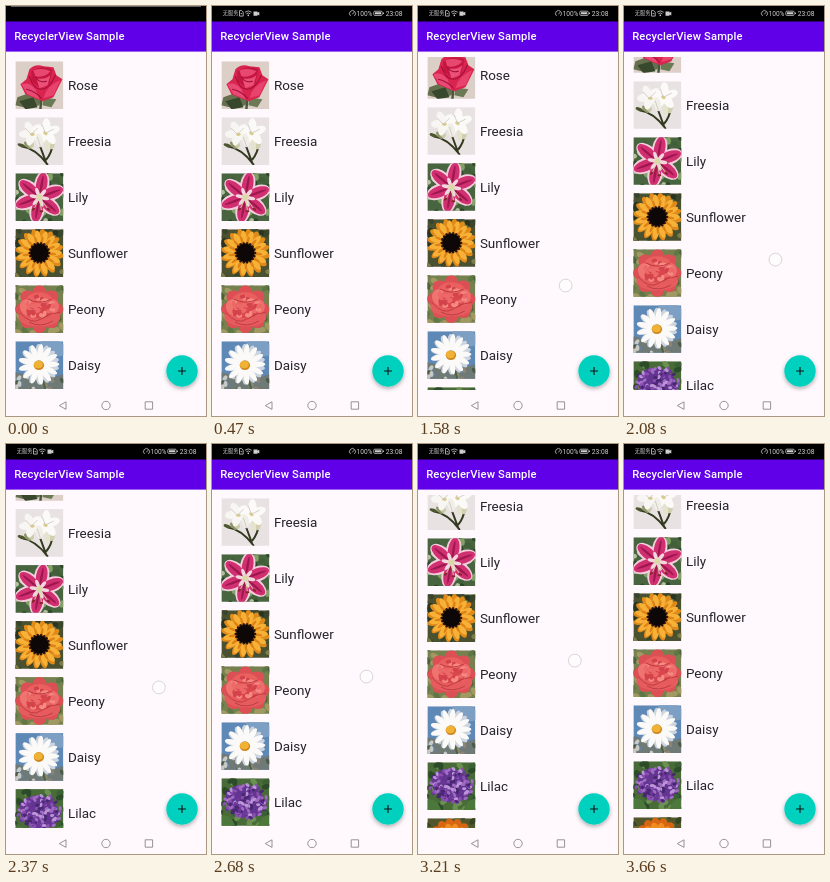
An HTML page for the animation above (3710 ms loop, 200 px wide and 410 px high).

```html
<!DOCTYPE html>
<html lang="en">
<head>
<meta charset="utf-8">
<title>RecyclerView Sample</title>
<style>
  html, body { margin: 0; width: 100%; height: 100%; overflow: hidden; background: #fff8fd; }
  #stage { display: block; width: 200px; height: 410px; font-family: Roboto, sans-serif; }
  .title { font-size: 11.2px; font-weight: 500; letter-spacing: .0125em; fill: #fff; }
  .name { font-size: 13.45px; fill: #252428; }
  #status { font-size: 6.6px; fill: #cfcfcf; }
  .line { fill: none; stroke: #cfcfcf; stroke-width: .8; }
  .nav { fill: none; stroke: #8b878b; stroke-width: .9; }
</style>
</head>
<body>
<svg id="stage" viewBox="0 0 200 410">
  <defs>
    <clipPath id="view"><rect y="51" width="200" height="333"/></clipPath>
    <filter id="shadow" x="-40%" y="-40%" width="180%" height="190%">
      <feDropShadow dx="0" dy="1.8" stdDeviation="2.2" flood-opacity=".32"/>
    </filter>
  </defs>
  <rect width="200" height="410" fill="#fff8fd"/>
  <g clip-path="url(#view)"><g id="list"></g></g>
  <rect width="200" height="16" fill="#000"/>
  <rect y="15.5" width="200" height="30.1" fill="#5f00e8"/>
  <text class="title" x="8.2" y="34.3">RecyclerView Sample</text>
  <path id="edge" d="M5 .5H195" stroke="#666"/>

  <g id="status" transform="translate(0 -.4)">
    <text x="10.8" y="9.9" font-size="5.2" font-family="Noto Sans CJK SC, Noto Sans CJK, sans-serif">无服务</text>
    <path class="line" d="M27.5 5h2.2l1.5 1.5v4h-3.7zM28.6 8h1.5M33 6.6q3.3-2.6 6.6 0M34.3 8.2q2-1.6 4 0"/>
    <circle cx="36.3" cy="9.8" r=".8"/>
    <path d="M41.5 5.8h4v1.3l1.8-1v3.8l-1.8-1v1.3h-4z"/>
    <path class="line" d="M138.6 10.3a3 3 0 1 1 3.8 0M140.4 8.7l1.5-2"/>
    <text x="144.5" y="10.1">100%</text>
    <rect class="line" x="161.8" y="5.6" width="8.4" height="4.2" rx="1"/>
    <path d="M163 6.7h6v2h-6zM171 7h.9v1.5h-.9z"/>
    <text x="173.8" y="10.2" font-size="6.7">23:08</text>
  </g>

  <circle id="touch" r="6.4" fill="#fff" fill-opacity=".6" stroke="#cfcbcf" stroke-width=".8"/>
  <circle cx="176" cy="365" r="15.7" fill="#06d1be" filter="url(#shadow)"/>
  <path d="M172.1 365h7.8M176 361.1v7.8" stroke="#111" stroke-width="1.1"/>
  <path class="nav" d="M60 395.8v7.6l-6.7-3.8zM139.2 395.8h7.4v7.4h-7.4z"/>
  <circle class="nav" cx="100" cy="399.5" r="4.2"/>
</svg>
<script>
const $ = id => document.getElementById(id);

const fillRect = color => `<rect width="48" height="48" fill="${color}"/>`;
const oval = (x, y, rx, ry, fill, turn = 0) =>
  `<ellipse cx="${x}" cy="${y}" rx="${rx}" ry="${ry}" fill="${fill}" transform="rotate(${turn} ${x} ${y})"/>`;
const shape = (d, fill) => `<path d="${d}" fill="${fill}"/>`;
const stroke = (d, color, width = 1) =>
  `<path d="${d}" fill="none" stroke="${color}" stroke-width="${width}" stroke-linecap="round"/>`;

// Petals around a centre
const ring = (n, x, y, dist, rx, ry, fill, start = 0) =>
  Array.from({ length: n }, (_, i) => {
    const deg = start + i * 360 / n, a = deg * Math.PI / 180;
    return oval(x + dist * Math.cos(a), y + dist * Math.sin(a), rx, ry, fill, deg);
  }).join('');

// Seeded scatter inside an ellipse
function scatter(n, x, y, w, h, size, colors, seed = 7) {
  const random = () => (seed = seed * 16807 % 2147483647) / 2147483647;
  random();
  return Array.from({ length: n }, (_, i) => {
    const a = random() * 6.283, r = Math.sqrt(random());
    return oval(x + w * r * Math.cos(a), y + h * r * Math.sin(a),
      size, size * .65, colors[i % colors.length], random() * 180);
  }).join('');
}

const leaves = (colors, seed) => scatter(60, 24, 24, 36, 36, 4, colors, seed);

const flowers = {
  Rose: fillRect('#dccfc8')
    + shape('M2 36L16 31 26 37 24 44 12 47 0 44z', '#66704e') + shape('M4 40L18 36 22 46 10 48z', '#37482c')
    + shape('M28 36L41 38 36 46 27 44z', '#6b7a55') + stroke('M26 36L25 48', '#44573a', 2.4)
    + shape('M14 8Q20 2 28 5L38 6 41 14 47 18 42 28 38 36 27 40 17 36 10 33 5 23 11 18z', '#d9244f')
    + shape('M6 23Q14 20 20 28L24 38 12 33z', '#e94a75') + shape('M28 37Q31 24 45 19L38 34z', '#e8436d')
    + shape('M16 10Q26 3 37 8L34 22 24 26 16 20z', '#c41641')
    + shape('M18 9Q27 6 35 10 29 17 20 15z', '#e8486f') + shape('M21 17Q29 19 35 14L32 24 24 27z', '#ea5078')
    + stroke('M14 15Q18 28 26 28T40 14M11 28Q20 30 26 37M20 16Q24 22 31 20', '#a40f37', 1.1),

  Freesia: fillRect('#e9e2e3')
    + stroke('M6 29Q20 31 32 47M31 46L24 27M31 42Q36 36 37 28', '#343a20', 2)
    + oval(6, 28, 4, 1.6, '#4d5630', 20) + oval(12, 28, 4.5, 2, '#8d9466', 50) + oval(15, 26, 3, 5, '#c9caa8', -25)
    + oval(37, 27, 2.4, 5, '#d2d0b0', 10) + oval(32, 28, 2.5, 6, '#e6e3cc')
    + ring(5, 16, 16, 5.5, 7, 4, '#f8f6f3', 30) + ring(5, 31, 15, 6, 8, 4.2, '#fbfaf8', -18)
    + oval(24, 23, 3.6, 7, '#f0eee6', -10)
    + oval(17, 17, 2.4, 1.6, '#d8ca8c') + oval(30, 16, 2.4, 1.6, '#dccd86', 30)
    + stroke('M10 11L16 17 22 11M27 8L30 16 38 12M22 20L25 29', '#c9c5bc', .8),

  Lily: fillRect('#486540') + leaves(['#2c4628', '#83a066', '#41603a', '#b5bfa0'], 13)
    + ring(6, 24, 24, 13, 13, 7.6, '#f3cfdd', -20) + ring(6, 24, 24, 13, 12, 5.6, '#d02f70', -20)
    + ring(6, 24, 24, 12, 10, 1.2, '#a01750', -20) + ring(6, 24, 24, 5, 5, 1.8, '#f3d6de', 10)
    + oval(24, 24, 3, 3, '#dcd9a6')
    + stroke('M24 24L32 35M24 24L26 37M24 24L19 35', '#d5dcae', .9)
    + oval(33, 36, 2, 1, '#7a2a24', 35) + oval(26, 38, 2, 1, '#7a2a24') + oval(18, 36, 2, 1, '#7a2a24', -40),

  Sunflower: fillRect('#4a5130') + leaves(['#2a351f', '#7b7c49', '#39442c'], 19)
    + ring(16, 24, 23.5, 16, 8.5, 3.6, '#e08a1a', 8) + ring(15, 24, 23.5, 14.5, 8, 3, '#f8b137')
    + ring(13, 24, 23.5, 12, 5, 1.3, '#dd8215', 5)
    + ring(18, 24, 23.5, 8, 3, 1.6, '#2e160c') + oval(24, 23.5, 9, 9, '#0d0707'),

  Peony: fillRect('#77804f') + leaves(['#4b6138', '#a09a62', '#5f7745'], 29)
    + ring(8, 24, 24, 13, 11, 8, '#dc4f54') + oval(24, 32, 21, 9, '#e65c5e')
    + oval(13, 22, 9, 8, '#ef736f', 40) + oval(35, 22, 9, 8, '#ee6d6b', -40)
    + oval(24, 15, 13, 8, '#e9605f') + oval(24, 26, 13, 7, '#d9474d')
    + scatter(30, 24, 21, 15, 11, 3, ['#f48a82', '#d3434b', '#ec6967'], 11)
    + stroke('M5 28Q16 40 25 34T44 27M13 14Q24 20 36 14M14 37Q25 43 37 36', '#bf3b43', 1),

  Daisy: fillRect('#5e88b6') + oval(38, 6, 14, 8, '#7d9fc3', 20)
    + shape('M0 31L13 34 30 38 48 33V48H0z', '#6f7a76')
    + scatter(24, 23, 43, 28, 9, 3, ['#4c5a48', '#8d8473', '#61809f', '#c9c9c4'], 9)
    + stroke('M25 30L30 48', '#49633b', 2)
    + ring(14, 23.5, 23, 12, 8.5, 3.2, '#ccd5df', 12) + ring(13, 23.5, 23, 12, 8.5, 2.8, '#fbfaf8')
    + oval(23.5, 24, 5.2, 4.8, '#cf861d') + oval(23, 23.2, 4.4, 3.8, '#efb235'),

  Lilac: fillRect('#486b38') + leaves(['#2c4b29', '#6b9150', '#3a6033'], 31)
    + oval(24, 23, 20, 16, '#633590', 20)
    + scatter(120, 24, 23, 22, 18, 2.3, ['#8950b1', '#bd94d8', '#6b379a', '#a06bc3', '#472870'], 17)
    + shape('M0 38Q9 34 14 48H0zM36 48Q39 38 48 36V48z', '#4c793b'),

  Marigold: fillRect('#52562b') + leaves(['#35451f', '#6c6c32'], 37)
    + ring(15, 24, 23, 15, 8, 5, '#d76612') + ring(13, 24, 23, 11, 7, 4, '#ef8d21', 8)
    + ring(9, 24, 23, 6, 5, 3, '#c95710')
};

$('list').innerHTML = Object.entries(flowers).map(([name, art], i) =>
  `<svg x="9.4" y="${55.3 + 56 * i}" width="47.9" height="47.6">${art}</svg>
   <text class="name" x="61.9" y="${84.2 + 56 * i}">${name}</text>`).join('');

const LOOP = 3710;
const drag = [[1250, 0], [1580, 10], [2080, 36], [2680, 57], [3210, 73], [3290, 74]];

function scrollAt(t) {
  const next = drag.findIndex(([time]) => time > t);
  if (next === 0) return 0;
  if (next < 0) return drag.at(-1)[1];
  const [t0, y0] = drag[next - 1], [t1, y1] = drag[next];
  return y0 + (y1 - y0) * (t - t0) / (t1 - t0);
}

const show = (id, visible) => { $(id).style.display = visible ? '' : 'none'; };

function draw() {
  const t = performance.now() % LOOP, y = scrollAt(t);
  $('list').setAttribute('transform', `translate(0 ${-y})`);
  $('touch').setAttribute('transform', `translate(${146.2 + .145 * y} ${289.6 - y})`);
  show('touch', t >= 1200 && t < 3290);
  show('status', t >= 50);
  show('edge', t < 50);
  requestAnimationFrame(draw);
}
draw();
</script>
</body>
</html>
```
